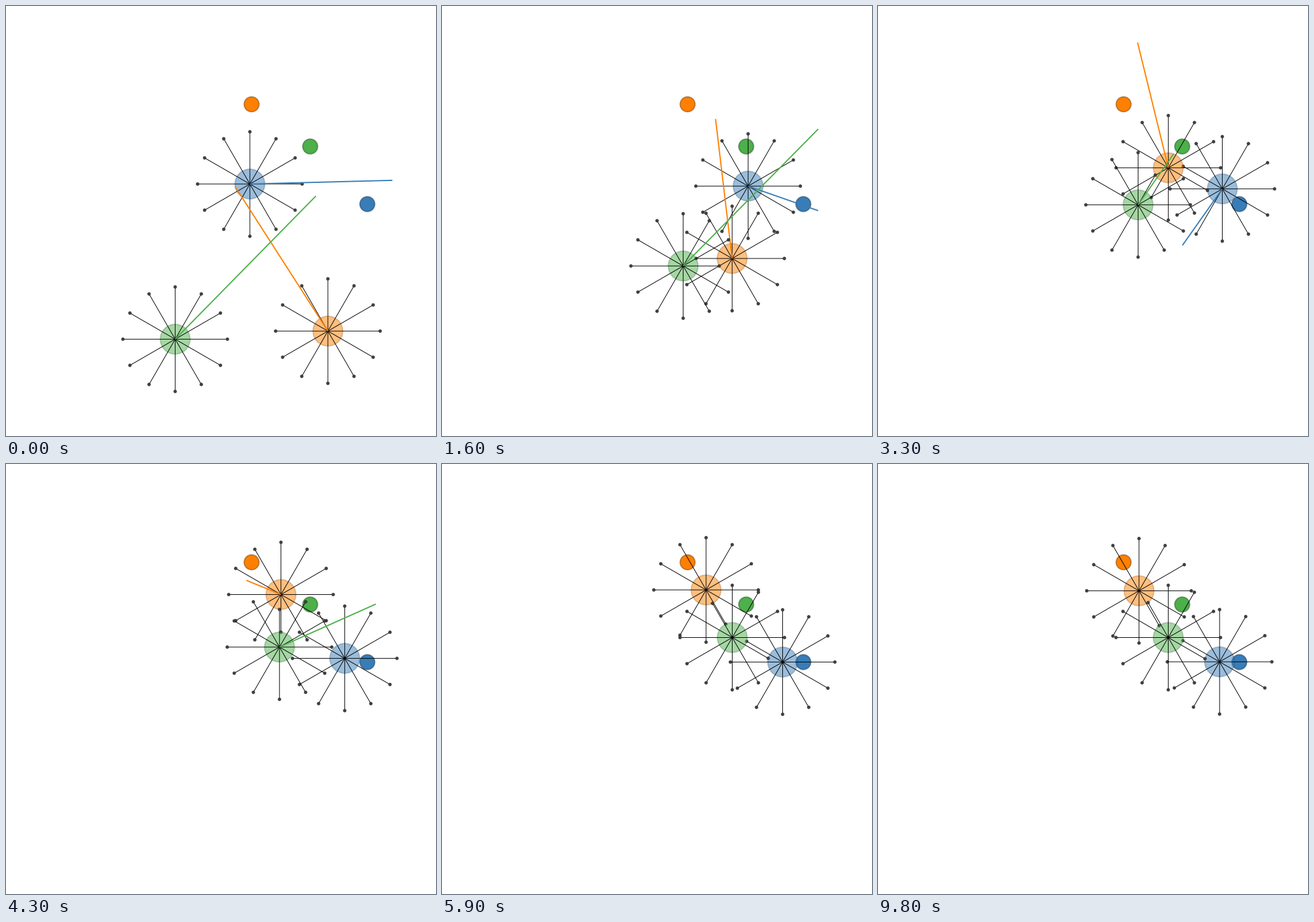
A matplotlib script for the animation above (9.9 s loop, 700 by 700 pixels).

```python
import numpy as np
import matplotlib.pyplot as plt
from matplotlib.animation import FuncAnimation
from matplotlib.collections import LineCollection, PolyCollection
from matplotlib.patches import Circle

SIZE, DPI = 700, 100
FRAMES, INTERVAL = 99, 100
UNIT = SIZE / 2.88            # pixels per world unit
AGENT_R, GOAL_R, DOT_R = 0.1 * UNIT, 0.05 * UNIT, 0.01 * UNIT
REACH = 0.35 * UNIT
PX = 72 / DPI                 # one pixel in points

BLUE, ORANGE, GREEN = (0.22, 0.49, 0.72), (1.0, 0.5, 0.0), (0.30, 0.69, 0.29)

KEYS = [0, 16, 33, 43, 59]    # steps of the key points; then agents settle
SETTLE = 15                   # time constant of settling, in steps

# Colour, goal, resting place, key positions, key pushes (pixels, y down)
AGENTS = [
    (BLUE, (588.2, 322.5), (556.2, 322),
     [(397, 289.8), (498.3, 293.2), (560.5, 297.7), (551.4, 316.4),
      (554.5, 322.4)],
     [(232, -6), (114, 40), (-65, 92), (0, 0), (0, 0)]),
    (ORANGE, (399.8, 160), (424.5, 206.5),
     [(524, 529.2), (472.3, 411), (472.6, 263.4), (447.6, 212.5),
      (429.9, 205)],
     [(-151, -235), (-27, -227), (-50, -204), (-56, -23), (0, 0)]),
    (GREEN, (495.2, 228.7), (472.5, 282.5),
     [(275.4, 542.4), (392.6, 423.2), (423.4, 323.7), (445.2, 298),
      (472.5, 282.5)],
     [(229, -233), (220, -223), (58, -83), (157, -70), (0, 0)]),
]


def travel_matrix(count):
    """Damped motion: a step keeps 75% of the speed and adds 1% of the push."""
    steps = np.arange(count, dtype=float)
    speed = np.tril(0.01 * 0.75 ** np.subtract.outer(steps, steps))
    return np.cumsum(speed, axis=0) - speed[0]


def solve(points, pushes, rest):
    """Smoothest pushes through the key points, then an eased settling."""
    count = KEYS[-1] + 1
    start = np.array(points[0])
    travel, unit = travel_matrix(count), np.eye(count)
    rows = np.vstack([np.diff(unit, axis=0), 500 * travel[KEYS[1:]],
                      20 * unit[KEYS]])
    wanted = np.vstack([np.zeros((count - 1, 2)),
                        500 * (np.array(points[1:]) - start),
                        20 * np.array(pushes)])
    push = np.linalg.lstsq(rows, wanted, rcond=None)[0]
    path = start + travel @ push

    late = np.arange(1, FRAMES - count + 1)[:, None]
    settled = rest + (path[-1] - rest) * np.exp(-late / SETTLE)
    push = np.vstack([push, np.zeros_like(settled)])
    return np.vstack([path, settled]), np.clip(push, -UNIT, UNIT)


def ring(count):
    angle = np.arange(count) * 2 * np.pi / count
    return np.column_stack([np.cos(angle), np.sin(angle)])


RAYS, DOT = ring(12), DOT_R * ring(24)


def ray_ends(center, others):
    """Ray tips, cut short where a ray meets another agent's disc."""
    length = np.full(len(RAYS), REACH)
    for other in others:
        offset = other - center
        along = RAYS @ offset
        gap = AGENT_R ** 2 - (offset @ offset - along ** 2)
        hit = along - np.sqrt(np.maximum(gap, 0))
        met = (gap > 0) & (hit > 0)
        length = np.where(met, np.minimum(length, hit), length)
    return center + RAYS * length[:, None]


def disc(center, radius, color, alpha, z):
    edge = tuple(0.5 * c for c in color) + (0.5 * alpha,)
    return ax.add_patch(Circle(center, radius, fc=color + (alpha,), ec=edge,
                               lw=2 * PX, zorder=z))


fig = plt.figure(figsize=(SIZE / DPI, SIZE / DPI), dpi=DPI, facecolor="white")
ax = fig.add_axes([0, 0, 1, 1])
ax.set_xlim(0, SIZE)
ax.set_ylim(SIZE, 0)
ax.axis("off")


class Agent:
    def __init__(self, index, color, goal, rest, points, pushes):
        self.path, self.push = solve(points, pushes, np.array(rest))
        z = 2 + 4 * index
        disc(goal, GOAL_R, color, 1.0, 1)
        self.body = disc(self.path[0], AGENT_R, color, 0.5, z)
        self.rays = LineCollection([], colors="black", linewidths=PX,
                                   capstyle="butt", zorder=z + 1)
        self.dots = PolyCollection([], facecolors=[(0.25, 0.25, 0.25, 1)],
                                   edgecolors=[(0.125, 0.125, 0.125, 0.5)],
                                   linewidths=PX, zorder=z + 2)
        for item in (self.rays, self.dots):
            item.set_snap(False)
            ax.add_collection(item, autolim=False)
        self.arrow, = ax.plot([], [], color=color, lw=2 * PX, zorder=z + 3,
                              solid_capstyle="butt", snap=False)

    def pose(self, step, others):
        center = self.path[step]
        tips = ray_ends(center, others)
        head = center + self.push[step]
        self.body.center = center
        self.rays.set_segments([(center, tip) for tip in tips])
        self.dots.set_verts([tip + DOT for tip in tips])
        self.arrow.set_data([center[0], head[0]], [center[1], head[1]])
        return [self.body, self.rays, self.dots, self.arrow]


agents = [Agent(i, *spec) for i, spec in enumerate(AGENTS)]


def update(step):
    drawn = []
    for agent in agents:
        others = [a.path[step] for a in agents if a is not agent]
        drawn += agent.pose(step, others)
    return drawn


anim = FuncAnimation(fig, update, frames=FRAMES, interval=INTERVAL,
                     repeat=True, repeat_delay=0, blit=False)
plt.show()
```
